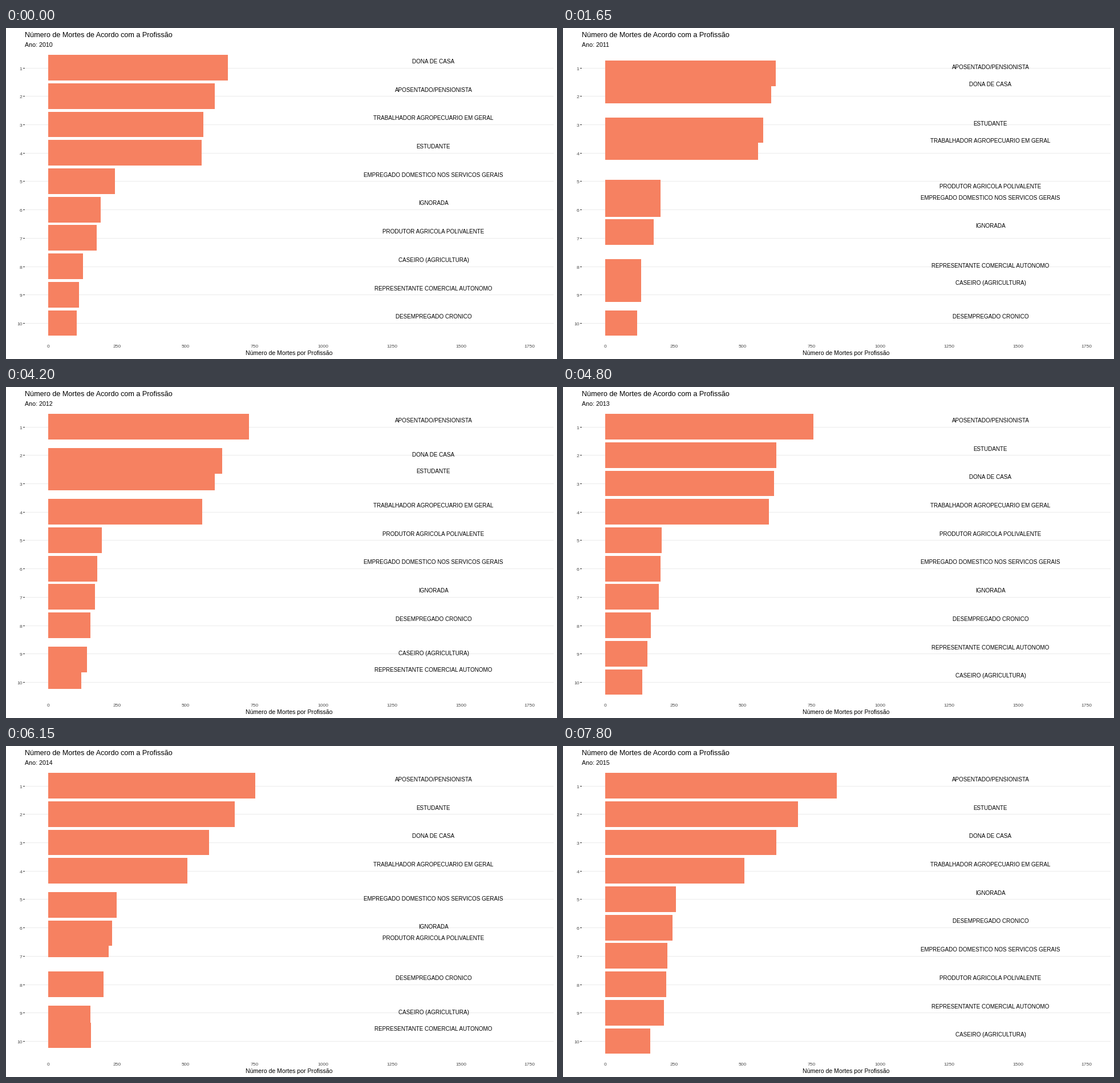
Animation, 966 px wide and 580 px high, one loop 8000 ms. Source, as a matplotlib script:

```python
import math

import matplotlib.pyplot as plt
from matplotlib.animation import FuncAnimation
from matplotlib.patches import Rectangle

W, H, DPI = 966, 580, 100
INTERVAL, LOOP = 50, 8000
HOLD, CYCLE, STEP = 1200, 1500, 150
FIRST_YEAR = 2010
ZERO_X, UNIT = 74, 844 / 1750
ROW_TOP, ROW_GAP, BAR_H = 69.6, 49.7, 44.8
LABEL_X = 749.5
CORAL, GRID, GREY = "#F68161", "#EBEBEB", "#4D4D4D"

# Deaths per year, 2010 to 2015
DEATHS = {
    "DONA DE CASA": (653, 592, 637, 613, 577, 622),
    "APOSENTADO/PENSIONISTA": (605, 624, 723, 757, 751, 842),
    "TRABALHADOR AGROPECUARIO EM GERAL": (564, 554, 551, 595, 483, 506),
    "ESTUDANTE": (558, 579, 601, 623, 692, 700),
    "EMPREGADO DOMESTICO NOS SERVICOS GERAIS": (243, 190, 172, 201, 262, 225),
    "IGNORADA": (191, 173, 164, 194, 242, 257),
    "PRODUTOR AGRICOLA POLIVALENTE": (177, 206, 192, 206, 222, 221),
    "CASEIRO (AGRICULTURA)": (126, 133, 143, 134, 159, 164),
    "REPRESENTANTE COMERCIAL AUTONOMO": (113, 136, 111, 153, 156, 213),
    "DESEMPREGADO CRONICO": (103, 120, 150, 166, 211, 245),
}
YEARS = 6


def rank_in_year(year):
    order = sorted(DEATHS, key=lambda job: -DEATHS[job][year])
    return {job: place for place, job in enumerate(order, 1)}


RANKS = [rank_in_year(year) for year in range(YEARS)]

plt.rcParams["font.family"] = "Liberation Sans"
fig = plt.figure(figsize=(W / DPI, H / DPI), dpi=DPI, facecolor="white")
ax = fig.add_axes([0, 0, 1, 1])
ax.set_xlim(0, W)
ax.set_ylim(H, 0)
ax.axis("off")


def row_y(rank):
    return ROW_TOP + (rank - 1) * ROW_GAP


def text(x, y, content, px, color="black", ha="left"):
    return ax.text(x, y, content, fontsize=px * 72 / DPI, color=color,
                   ha=ha, va="baseline", zorder=3)


def box(x, y, width, height, color, zorder=1):
    return ax.add_patch(Rectangle((x, y), width, height, facecolor=color,
                                  linewidth=0, antialiased=False, zorder=zorder))


text(33, 16.5, "Número de Mortes de Acordo com a Profissão", 12.6)
subtitle = text(33, 33, "", 10.6)
text(496.5, 573, "Número de Mortes por Profissão", 10.45, ha="center")

for value in range(0, 1751, 250):
    text(ZERO_X + value * UNIT, 560, str(value), 8.5, GREY, "center")

for rank in range(1, 11):
    line_y = math.floor(row_y(rank) + 0.5)
    box(33, line_y, 927, 1, GRID)
    box(30, line_y, 3, 1, "#333333")
    text(28.5, line_y + 4, str(rank), 8.5, GREY, "right")

bars = {job: box(ZERO_X, 0, 0, BAR_H, CORAL, 2) for job in DEATHS}
labels = {job: text(LABEL_X, 0, job, 9.85, ha="center") for job in DEATHS}


def progress(ms):
    """Return the starting year index and the share of the move to the next."""
    if ms < HOLD:
        return 0, 0.0
    year, phase = divmod(ms - HOLD, CYCLE)
    return year, min(5, phase // STEP + 1) / 5


def mix(a, b, share):
    return a + (b - a) * share


def update(frame):
    year, share = progress(frame * INTERVAL)
    subtitle.set_text(f"Ano: {FIRST_YEAR + year + (share > 0.5)}")
    for job, counts in DEATHS.items():
        y = row_y(mix(RANKS[year][job], RANKS[year + 1][job], share))
        bars[job].set_y(y - BAR_H / 2)
        bars[job].set_width(mix(counts[year], counts[year + 1], share) * UNIT)
        labels[job].set_y(y - 7.6)
    return [subtitle, *bars.values(), *labels.values()]


animation = FuncAnimation(fig, update, frames=LOOP // INTERVAL,
                          interval=INTERVAL, repeat=True, repeat_delay=0)
plt.show()
```
